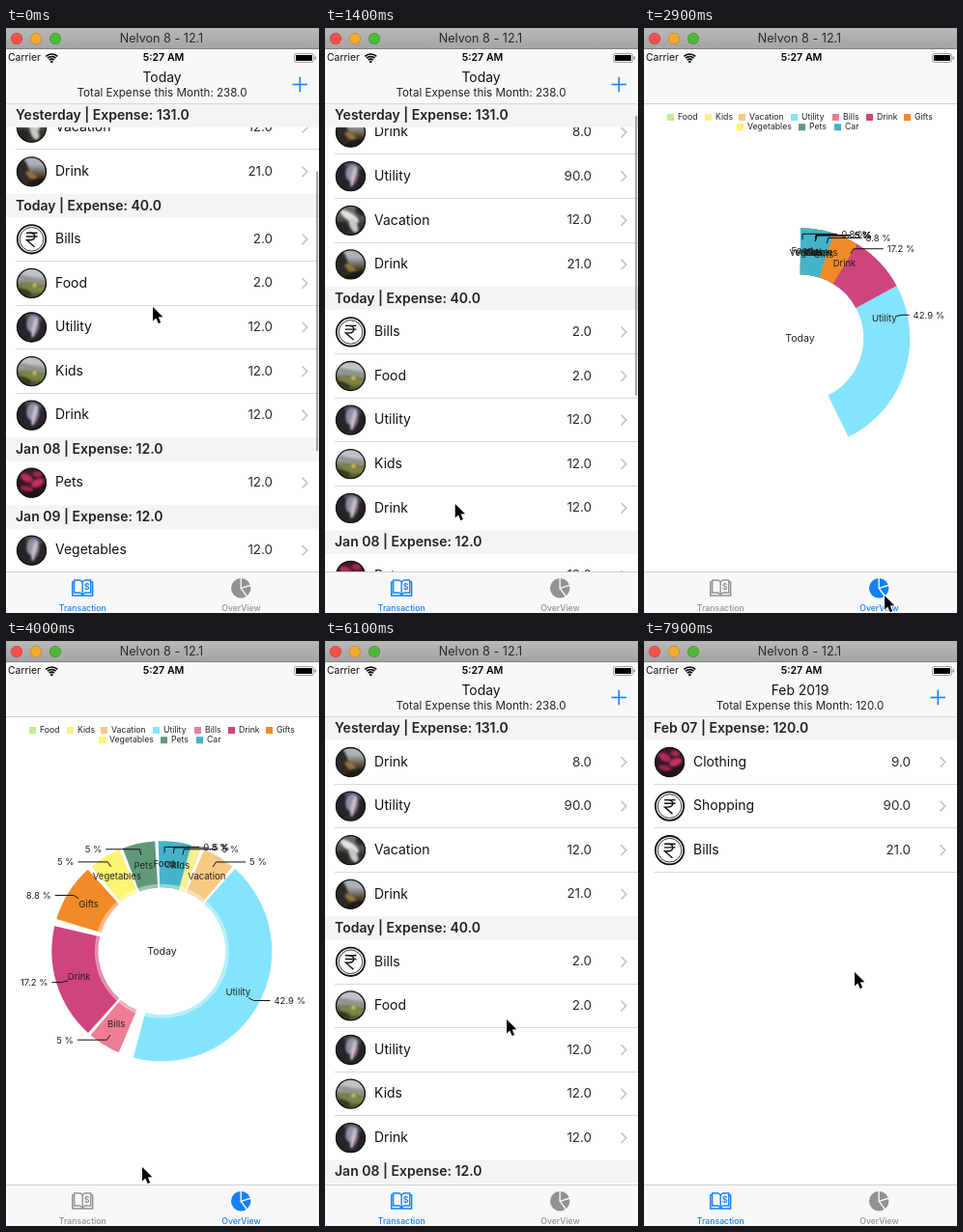
An HTML page with a canvas that plays this animation: 324x606 px, repeating every 8 s.

```html
<!DOCTYPE html>
<html lang="en">
<head>
<meta charset="utf-8">
<title>Expense tracker</title>
<style>
html, body { margin: 0; width: 324px; height: 606px; overflow: hidden; background: #fff; }
canvas { display: block; }
</style>
</head>
<body>
<canvas id="stage" width="324" height="606"></canvas>
<script>
const ctx = document.getElementById('stage').getContext('2d');
const LOOP = 8000, STEP = 100;
const TOP = 78.5, BOTTOM = 563, HEAD = 24.4, ROW = 45.6;
const BLUE = '#1580fb', GRAY = '#929292';
const OVERVIEW = [2850, 5250], MONTH = 6650, PIE = 2900, PIE_TIME = 1375;

// Rows: name, amount, thumbnail
const january = [
  ['Yesterday | Expense: 131.0', [['Drink', '8.0', 'hill'], ['Utility', '90.0', 'night'], ['Vacation', '12.0', 'falls'], ['Drink', '21.0', 'hill']]],
  ['Today | Expense: 40.0', [['Bills', '2.0', ''], ['Food', '2.0', 'field'], ['Utility', '12.0', 'night'], ['Kids', '12.0', 'field'], ['Drink', '12.0', 'night']]],
  ['Jan 08 | Expense: 12.0', [['Pets', '12.0', 'flower']]],
  ['Jan 09 | Expense: 12.0', [['Vegetables', '12.0', 'night']]],
  ['Jan 10 | Expense: 10.0', [['Bills', '10.0', '']]],
  ['Jan 11 | Expense: 21.0', [['Gifts', '21.0', 'field']]],
  ['Jan 12 | Expense: 12.0', [['Car', '12.0', 'hill']]]
];
const february = [
  ['Feb 07 | Expense: 120.0', [['Clothing', '9.0', 'flower'], ['Shopping', '90.0', ''], ['Bills', '21.0', '']]]
];

// Sky colour, ground colour, then blobs: colour, x, y, rx, ry, turn
const thumbs = {
  hill: ['#a9b0b6', '#4f4026', ['#2b2a26', -11, -2, 8, 15, -.3], ['#94733d', 0, 4, 7, 3, .6], ['#1d1b16', 6, 12, 13, 5, -.2]],
  night: ['#4a4d54', '#26272a', ['#232427', -10, 0, 6, 15, 0], ['#8f8fa6', 1, -4, 6, 9, .2], ['#c3bfd2', 3, 0, 2.5, 11, .2], ['#232427', 12, 3, 5, 14, .2], ['#b06a86', 6, 2, 1, 6, .3]],
  falls: ['#6a6f6c', '#33352f', ['#e2e3df', -1, -4, 4, 11, -1], ['#c9cac4', 3, 5, 4, 8, -.4], ['#26271f', -9, 8, 7, 6, .6], ['#2c2d25', 10, -9, 6, 4, .6]],
  field: ['#bcc2c7', '#545a30', ['#8f9492', 0, -3, 15, 3, .3], ['#7c8248', 2, 5, 14, 5, .1], ['#e0cc5c', 3, 2, 2, 2, 0], ['#353a1f', -8, 10, 8, 4, .3]],
  flower: ['#3a1c28', '#26161c', ['#b52a5e', -5, -5, 7, 4, .5], ['#c23068', 6, 0, 7, 4, -.4], ['#9c2450', -5, 6, 7, 3, .2], ['#a92756', 6, -9, 5, 3, 0], ['#1d1217', 0, 13, 9, 3, 0]]
};

// Name, amount, colour
const slices = [
  ['Food', 2, '#bdee8e'], ['Kids', 12, '#faf08f'], ['Vacation', 12, '#f7c983'], ['Utility', 102, '#84e4fd'],
  ['Bills', 12, '#ee7d93'], ['Drink', 41, '#d0447d'], ['Gifts', 21, '#f08b28'], ['Vegetables', 12, '#fdf471'],
  ['Pets', 12, '#60997a'], ['Car', 12, '#45b3c9']
];
const legendX = [24, 63, 98, 152, 195, 230, 269, 96, 160, 197];

const pointer = [
  [0, 152, 289], [900, 127, 353], [1000, 127, 354], [1450, 135, 498], [2000, 233, 569], [2500, 249, 588],
  [3500, 249, 588], [4000, 141, 545], [4400, 139, 548], [5000, 79, 586], [5450, 79, 586], [6100, 188, 392],
  [6500, 235, 370], [6900, 177, 358], [7300, 177, 354], [7900, 218, 343]
];
const scrolling = [[0, 113.5], [900, 167.2], [1000, 167.2], [1500, 0]];

const clamp = v => Math.max(0, Math.min(1, v));
const smooth = v => v * v * (3 - 2 * v);

function track(keys, t) {
  const i = keys.findIndex(k => k[0] > t);
  if (i < 0) return keys[keys.length - 1].slice(1);
  const a = keys[i - 1], b = keys[i], p = smooth((t - a[0]) / (b[0] - a[0]));
  return a.slice(1).map((v, j) => v + (b[j + 1] - v) * p);
}

function text(s, x, y, size, align = 'left', color = '#111', weight = 400) {
  ctx.font = `${weight} ${size}px Inter, Roboto, sans-serif`;
  ctx.textAlign = align;
  ctx.textBaseline = 'middle';
  ctx.fillStyle = color;
  ctx.fillText(s, x, y);
}

function box(x, y, w, h, color) {
  ctx.fillStyle = color;
  ctx.fillRect(x, y, w, h);
}

function disc(x, y, r, color) {
  ctx.fillStyle = color;
  ctx.beginPath();
  ctx.arc(x, y, r, 0, 7);
  ctx.fill();
}

function ring(x, y, r, width, color) {
  ctx.strokeStyle = color;
  ctx.lineWidth = width;
  ctx.beginPath();
  ctx.arc(x, y, r, 0, 7);
  ctx.stroke();
}

function line(points, width, color) {
  ctx.strokeStyle = color;
  ctx.lineWidth = width;
  ctx.beginPath();
  points.forEach(p => ctx.lineTo(...p));
  ctx.stroke();
}

function rupee(x, y) {
  ring(x, y, 14.7, 1.8, '#111');
  ring(x, y, 12.3, .9, '#222');
  line([[x - 5.5, y - 6.5], [x + 6, y - 6.5]], 1.4, '#111');
  line([[x - 5.5, y - 2.8], [x + 6, y - 2.8]], 1.4, '#111');
  ctx.beginPath();
  ctx.moveTo(x - 2, y - 6.5);
  ctx.bezierCurveTo(x + 5, y - 6.5, x + 5, y + 1, x - 2, y + 1);
  ctx.lineTo(x - 5, y + 1);
  ctx.lineTo(x + 3, y + 8);
  ctx.stroke();
}

function thumb(kind, x, y) {
  if (!kind) return rupee(x, y);
  const [sky, ground, ...blobs] = thumbs[kind];
  ctx.save();
  ctx.translate(x, y);
  ctx.beginPath();
  ctx.arc(0, 0, 15.2, 0, 7);
  ctx.clip();
  const g = ctx.createLinearGradient(0, -15, 0, 15);
  g.addColorStop(.25, sky);
  g.addColorStop(.65, ground);
  box(-16, -16, 32, 32, g);
  ctx.filter = 'blur(1px)';
  for (const [color, bx, by, rx, ry, turn] of blobs) {
    ctx.fillStyle = color;
    ctx.beginPath();
    ctx.ellipse(bx, by, rx, ry, turn, 0, 7);
    ctx.fill();
  }
  ctx.restore();
  ring(x, y, 15, 1.3, '#111');
}

function drawList(sections, scroll, dx) {
  ctx.save();
  ctx.beginPath();
  ctx.rect(0, TOP, 324, BOTTOM - TOP);
  ctx.clip();
  ctx.translate(dx, 0);
  let y = TOP - scroll;
  for (const [title, rows] of sections) {
    const end = y + HEAD + rows.length * ROW;
    rows.forEach(([name, amount, kind], i) => {
      const top = y + HEAD + i * ROW, mid = top + 22.6;
      if (top > BOTTOM || top + ROW < TOP) return;
      thumb(kind, 26.5, mid);
      text(name, 51, mid, 14);
      text(amount, 276, mid, 13.4, 'right', '#2a2a2a');
      line([[306.5, mid - 5.3], [311.8, mid], [306.5, mid + 5.3]], 1.6, '#c4c4c8');
      if (i < rows.length - 1 || sections.length === 1) box(10, Math.round(top + ROW - .7), 314, 1, '#d9d9db');
    });
    const head = Math.max(y, Math.min(TOP, end - HEAD));
    box(0, head, 324, HEAD, '#f4f4f4');
    text(title, 10, head + 12.5, 14, 'left', '#222', 600);
    y = end;
  }
  ctx.restore();
}

function drawScrollbar(scroll, t) {
  const view = BOTTOM - TOP;
  const total = january.reduce((sum, s) => sum + HEAD + s[1].length * ROW, 0);
  ctx.globalAlpha = .65 * clamp((1900 - t) / 300);
  ctx.fillStyle = '#777';
  ctx.beginPath();
  ctx.roundRect(321, TOP + 2 + scroll * view / total, 2.2, view * view / total, 1.1);
  ctx.fill();
  ctx.globalAlpha = 1;
}

function drawTransactions(t) {
  const [scroll] = track(scrolling, t);
  const p = smooth(clamp((t - MONTH) / 350)), next = t >= MONTH;
  if (p < 1) drawList(january, scroll, -324 * p);
  if (p > 0) drawList(february, 0, 324 * (1 - p));
  drawScrollbar(scroll, t);
  text(next ? 'Feb 2019' : 'Today', 161.5, 52, 13.9, 'center');
  text(`Total Expense this Month: ${next ? '120.0' : '238.0'}`, 161.5, 68, 11.6, 'center', '#222');
  line([[296.5, 58.5], [312, 58.5]], 1.6, BLUE);
  line([[304.3, 50.7], [304.3, 66.3]], 1.6, BLUE);
}

function drawPie(t) {
  const cx = 161.3, cy = 321.3, R = 114, rad = Math.PI / 180;
  const u = clamp((t - PIE) / PIE_TIME) - 1;
  const phase = 1 + 2.70158 * u ** 3 + 1.70158 * u ** 2;
  const at = (deg, r) => [cx + r * Math.sin(deg * rad), cy - r * Math.cos(deg * rad)];
  let angle = 0;
  const parts = slices.map(([name, value, color]) => {
    const start = angle * phase, sweep = value / 238 * 360;
    angle += sweep;
    return { name, value, color, start, sweep, mid: start + sweep / 2 };
  });
  for (const { start, sweep, color } of parts) {
    const a = (start + .45 - 90) * rad, b = (start + sweep - .45 - 90) * rad;
    ctx.fillStyle = color;
    ctx.beginPath();
    ctx.arc(cx, cy, R, a, b);
    ctx.arc(cx, cy, 66, b, a, true);
    ctx.fill();
  }
  ctx.globalAlpha = .41 * clamp(phase);
  ring(cx, cy, 67.7, 3.5, '#fff');
  ctx.globalAlpha = 1;
  for (const { name, value, mid } of parts) {
    const p0 = at(mid, 102), p1 = at(mid, 108);
    const side = Math.sin(mid * rad) >= 0 ? 1 : -1;
    const x = p1[0] + side * 36 * Math.abs(Math.cos(mid * rad));
    line([p0, p1, [x, p1[1]]], 1, '#111');
    const percent = +(value / 2.38).toFixed(1);
    text(`${percent} %`, x + side * 4, p1[1] + .5, 9.5, side > 0 ? 'left' : 'right', '#222');
    const [lx, ly] = at(mid, 89.7);
    text(name, lx, ly, 9.5, 'center', '#222');
  }
  text('Today', 161.5, 321.5, 10.6, 'center', '#222');
}

function drawOverview(t) {
  slices.forEach(([name, , color], i) => {
    const x = legendX[i], y = i < 7 ? 92.5 : 102.7;
    box(x, y - 3.5, 7, 7, color);
    text(name, x + 11, y, 8.7, 'left', '#222');
  });
  drawPie(t);
}

function drawTabs(overview) {
  box(0, BOTTOM, 324, 43, '#f8f8f8');
  box(0, BOTTOM, 324, 1, '#cfcfcf');
  const left = overview ? GRAY : BLUE, right = overview ? BLUE : GRAY;
  // Open book
  line([[70.5, 573.5], [68.8, 574], [68.8, 588], [89.6, 588], [89.6, 574], [88, 573.5]], 1.6, left);
  for (const side of [-1, 1]) {
    const x = d => 79.2 + side * d;
    line([[x(0), 573.8], [x(2.5), 572], [x(8.5), 572], [x(8.5), 585], [x(2.5), 585], [x(0), 587]], 1.3, left);
  }
  line([[79.2, 573], [79.2, 588]], 1.4, left);
  text('$', 83.7, 578.8, 9, 'center', left, 600);
  text('Transaction', 79.3, 601, 8.7, 'center', left, 500);
  // Pie symbol
  disc(243.2, 580.3, 10.2, right);
  line([[243.2, 569], [243.2, 580.3], [254, 577]], 1.4, '#f8f8f8');
  line([[243.2, 580.3], [250, 589.5]], 1.4, '#f8f8f8');
  text('OverView', 243.5, 601, 8.7, 'center', right, 500);
}

function drawChrome() {
  const g = ctx.createLinearGradient(0, 0, 0, 22);
  g.addColorStop(0, '#b9b9b9');
  g.addColorStop(1, '#a3a3a3');
  box(0, 0, 324, 22, g);
  box(0, 21, 324, 1, '#828282');
  ['#f5504b', '#f3ab2d', '#4fb83a'].forEach((c, i) => {
    disc(11 + 20 * i, 11, 6, c);
    ring(11 + 20 * i, 11, 5.7, .6, 'rgba(0,0,0,.25)');
  });
  text('Nelvon 8 - 12.1', 161, 11.5, 12.6, 'center', '#2a2a2a');

  box(0, 22, 324, 56, '#f8f8f8');
  box(0, 78, 324, 1, '#cfcfcf');
  text('Carrier', 2, 31, 10.4);
  ctx.lineWidth = 1.7;
  ctx.strokeStyle = '#000';
  for (const r of [3.8, 6.4, 9]) {
    ctx.beginPath();
    ctx.arc(47.3, 36, r, -2.3, -.84);
    ctx.stroke();
  }
  disc(47.3, 35, 1.3, '#000');
  text('5:27 AM', 163, 31, 10.6, 'center', '#000', 600);
  ctx.strokeStyle = '#888';
  ctx.lineWidth = .8;
  ctx.beginPath();
  ctx.roundRect(298.5, 26.5, 20, 9, 2);
  ctx.stroke();
  box(300, 28, 17, 6, '#000');
  box(319.6, 29.5, 1.2, 3, '#777');
}

function drawPointer(x, y) {
  ctx.beginPath();
  for (const [dx, dy] of [[0, 0], [0, 14.5], [3.3, 11.4], [5.7, 17], [8.2, 16], [5.8, 10.5], [10.3, 10.3]]) ctx.lineTo(x + dx, y + dy);
  ctx.closePath();
  ctx.strokeStyle = '#fff';
  ctx.lineWidth = 2;
  ctx.stroke();
  ctx.fillStyle = '#000';
  ctx.fill();
}

function frame() {
  const t = Math.floor((performance.now() + 30) / STEP) * STEP % LOOP;
  const overview = t >= OVERVIEW[0] && t < OVERVIEW[1];
  box(0, 0, 324, 606, '#fff');
  drawChrome();
  (overview ? drawOverview : drawTransactions)(t);
  drawTabs(overview);
  drawPointer(...track(pointer, t));
  requestAnimationFrame(frame);
}
frame();
</script>
</body>
</html>
```
